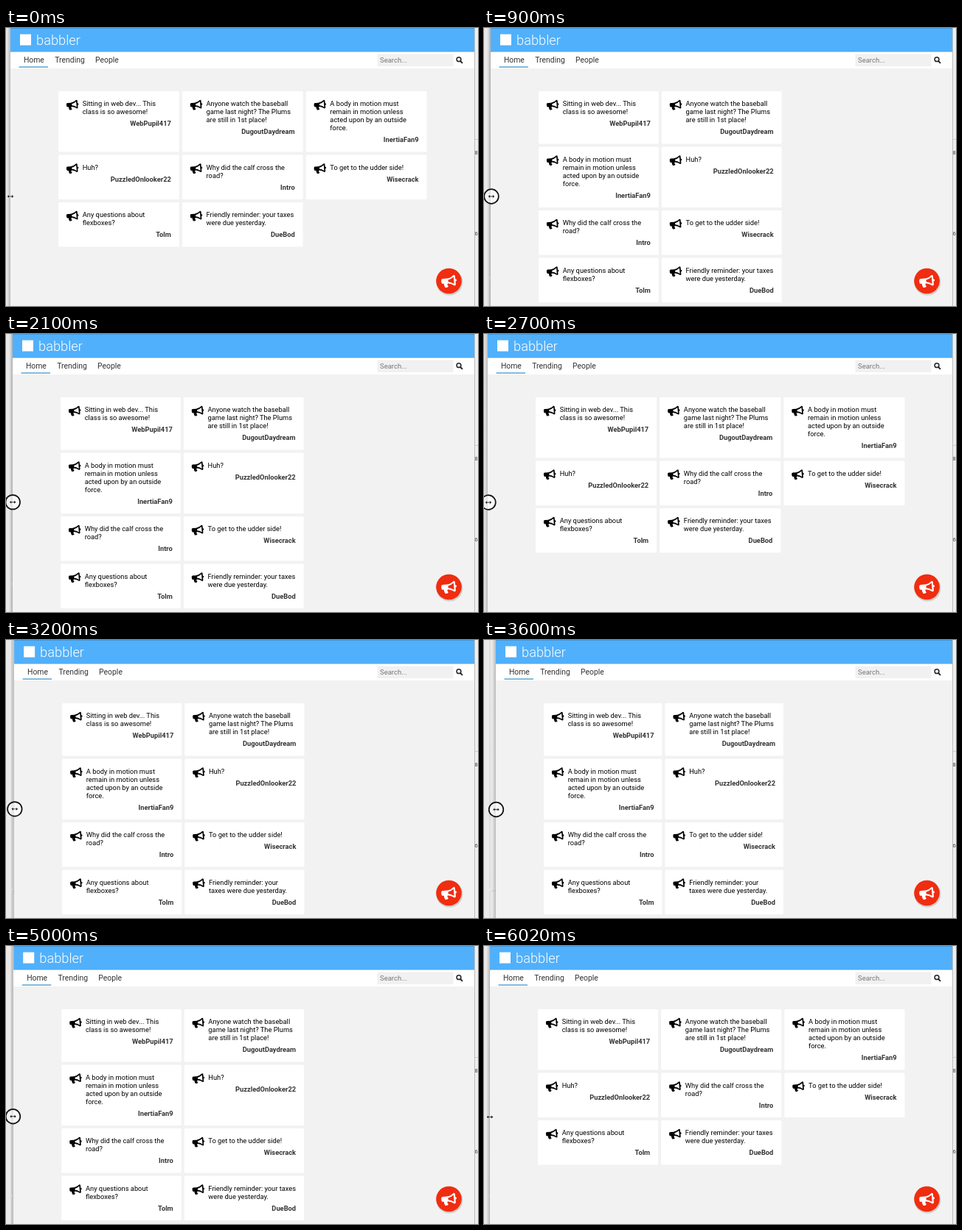
Write an HTML page that moves like this. It is 640 px wide and 378 px high and loops after 6140 ms.

```html
<!DOCTYPE html>
<html lang="en">
<head>
<meta charset="utf-8">
<title>Responsive cards</title>
<style>
  html, body { margin: 0; width: 100%; height: 100%; overflow: hidden; background: #f2f2f2; }
  svg { display: block; width: 640px; height: 378px; font: 9.3px Roboto, sans-serif; }
  .nav { font-size: 10.4px; fill: #333; }
  .title { font-size: 18.3px; font-weight: 300; fill: #fff; }
  .author { font-weight: 700; fill: #333; text-anchor: end; }
</style>
</head>
<body>
<svg id="stage" viewBox="0 0 640 378">
  <defs>
    <linearGradient id="shade">
      <stop offset="0" stop-color="#000" stop-opacity="0"/>
      <stop offset="1" stop-color="#000" stop-opacity=".2"/>
    </linearGradient>
    <path id="horn" transform="rotate(-5 8 7)" fill-rule="evenodd" d="M0 5.6Q0 4 1.6 4H6Q10 4 13.8 .8Q15.2 .8 15.2 2.2V5.4a1.3 1.3 0 0 1 0 2.6V11.2Q15.2 12.6 13.8 12.6Q10.5 9.8 7 9.4Q6 9.8 6.2 10.8Q6 11.6 7.2 12.6Q6.2 14.2 3.6 13.6Q2.2 11 2.6 9.4H1.6Q0 9.4 0 7.8ZM13.5 3Q10.5 5.3 7.4 5.6V7.8Q10.5 8.1 13.5 10.4Z"/>
  </defs>
  <rect width="640" height="378" fill="#e9e9e9"/>
  <path d="M16 341H11Q8 341 8 344V378M8 0V338" fill="none" stroke="#d2d2d2"/>
  <rect id="shadow" y="0" width="5" height="378" fill="url(#shade)"/>
  <g id="page">
    <rect width="640" height="378" fill="#f2f2f2"/>
    <rect y="32" width="640" height="23" fill="#fff"/>
    <rect width="640" height="32.3" fill="#51b0fb"/>
    <path d="M0 .5H640M0 32.3H640" stroke="#000" stroke-opacity=".12"/>
    <rect x="13" y="8.5" width="15" height="15" fill="#fff"/>
    <text class="title" x="35" y="22.5">babbler</text>
    <g class="nav">
      <text x="17.9" y="47">Home</text>
      <text x="60.3" y="47">Trending</text>
      <text x="115" y="47">People</text>
    </g>
    <rect x="11.5" y="52.3" width="39.5" height="1.5" fill="#5aa5d6"/>
  </g>
  <g id="cards"></g>
  <rect x="503.5" y="35.5" width="103" height="16.5" fill="#f1f1f1"/>
  <text x="507" y="47" fill="#777" font-size="9.5">Search...</text>
  <g fill="none" stroke="#222" stroke-width="1.5">
    <circle cx="614" cy="42.7" r="2.9"/>
    <path d="M616.2 45L619 47.8" stroke-width="1.9"/>
  </g>
  <circle cx="601.3" cy="345.5" r="18" fill="#000" opacity=".15"/>
  <circle cx="600.5" cy="344" r="17.3" fill="#f02d10"/>
  <use href="#horn" fill="#fff" transform="translate(590.3 335.3) scale(1.26)"/>
  <rect x="635" width="5" height="378" fill="#efefef"/>
  <path d="M635.5 0V378" stroke="#bdbdbd"/>
  <path d="M636 151.5H640" stroke="#ccc"/>
  <g font-size="7.5" fill="#444">
    <text x="635.5" y="172">8</text>
    <text x="635.5" y="282">6</text>
  </g>
  <g id="cursor">
    <circle id="ring" r="9.8" fill="#fff" fill-opacity=".6" stroke="#111" stroke-width="1.7"/>
    <path d="M-4.5 0L-1.8 -2.4V-.7H1.8V-2.4L4.5 0L1.8 2.4V.7H-1.8V2.4Z" stroke="#fff" stroke-width=".6"/>
  </g>
</svg>
<script>
const LOOP = 6140, RIGHT = 570.5, GAP = 4, LINE = 11;

// time, left edge of the window, pointer x and y
const path = [
  [0, 6, 6, 229], [500, 6, 6, 229], [900, 9, 10, 229], [1700, 13, 12.4, 228.3],
  [2500, 5, 6, 229], [2700, 5, 6, 229], [3600, 16, 16.5, 230.5],
  [4600, 12.5, 11, 231], [5400, 8, 8, 232.5], [LOOP, 8, 8, 232.5]
];

const posts = [
  ["Sitting in web dev... This|class is so awesome!", "WebPupil417"],
  ["Anyone watch the baseball|game last night? The Plums|are still in 1st place!", "DugoutDaydream"],
  ["A body in motion must|remain in motion unless|acted upon by an outside|force.", "InertiaFan9"],
  ["Huh?", "PuzzledOnlooker22"],
  ["Why did the calf cross the|road?", "Intro"],
  ["To get to the udder side!", "Wisecrack"],
  ["Any questions about|flexboxes?", "Tolm"],
  ["Friendly reminder: your taxes|were due yesterday.", "DueBod"]
];

const $ = id => document.getElementById(id);

function poseAt(t) {
  const i = path.findIndex(p => p[0] > t);
  const a = path[i - 1], b = path[i];
  const k = (t - a[0]) / (b[0] - a[0]);
  return a.map((v, j) => v + (b[j] - v) * k);
}

function cardMarkup(lines, author, x, y, w, h) {
  const text = lines.map((s, i) => `<text x="${x + 32.7}" y="${y + 20 + i * LINE}">${s}</text>`).join("");
  return `<rect x="${x}" y="${y}" width="${w}" height="${h}" rx="1.5" fill="#fff"/>
    <use href="#horn" x="${x + 11}" y="${y + 11.5}"/>${text}
    <text class="author" x="${x + w - 11}" y="${y + 25 + lines.length * LINE}">${author}</text>`;
}

function layout(edge) {
  const cols = edge < 8.5 ? 3 : 2;
  const left = edge + 65, pitch = (RIGHT + GAP - left) / 3;
  let y = 86, out = "";
  for (let i = 0; i < posts.length; i += cols) {
    const row = posts.slice(i, i + cols).map(([text, author]) => {
      if (edge > 11) text = text.replace("your taxes|were", "your|taxes were");
      return [text.split("|"), author];
    });
    const h = 38.5 + LINE * Math.max(...row.map(r => r[0].length));
    row.forEach((r, c) => out += cardMarkup(...r, left + c * pitch, y, pitch - GAP, h));
    y += h + GAP;
  }
  return out;
}

let last = -1;
function draw(now) {
  const t = Math.min(Math.floor(now % LOOP / 100) * 100, 6000);
  if (t !== last) {
    last = t;
    const [, edge, x, y] = poseAt(t);
    $("page").setAttribute("transform", `translate(${edge})`);
    $("shadow").setAttribute("x", edge - 5);
    $("cards").innerHTML = layout(edge);
    $("cursor").setAttribute("transform", `translate(${x} ${y})`);
    $("ring").setAttribute("visibility", t >= 500 && t < 5900 ? "visible" : "hidden");
  }
  requestAnimationFrame(draw);
}
draw(performance.now());
</script>
</body>
</html>
```
